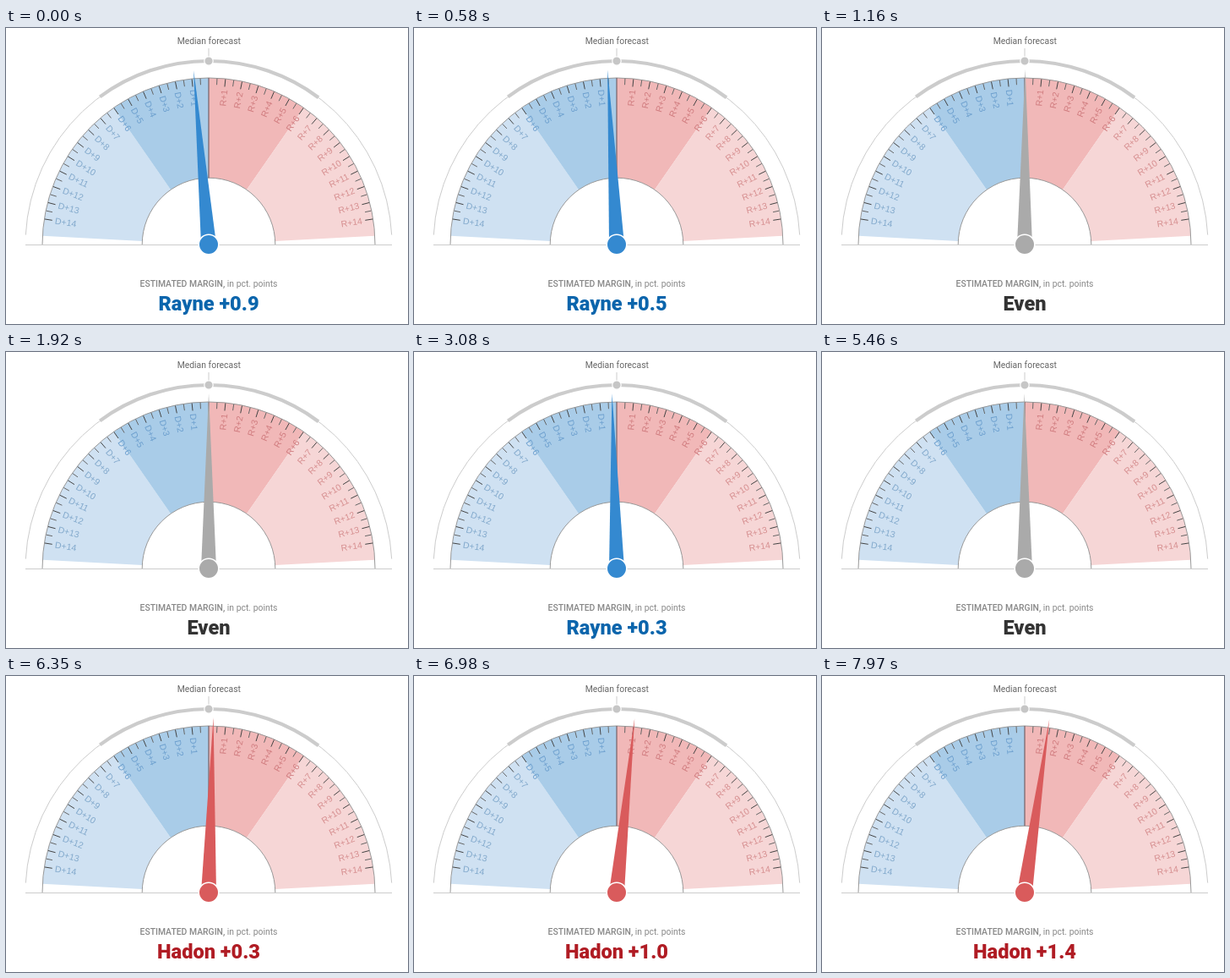
Recreate the animation shown at these times as an HTML page. Size 476 by 350 pixels, loop 8000 ms.

```html
<!DOCTYPE html>
<html lang="en">
<head>
<meta charset="utf-8">
<title>Election needle</title>
<style>
html, body { margin: 0; width: 100%; height: 100%; overflow: hidden; background: #fff; }
svg { display: block; width: 476px; height: 350px; font-family: Roboto, "Liberation Sans", sans-serif; }
.axis { fill: none; stroke: #999; }
.range { fill: none; stroke: #ccc; }
.label { font: 10.5px "Liberation Sans", Arial, sans-serif; }
</style>
</head>
<body>
<svg viewBox="0 0 476 350">
  <text x="240.3" y="19" text-anchor="middle" font-size="10.4" fill="#666">Median forecast</text>
  <g id="dial" transform="translate(240 256)"></g>
  <g id="needle">
    <path d="M-9 0L0 -207L9 0Z"/>
  </g>
  <circle id="hub" cx="240" cy="256" r="11.8" stroke="#fff" stroke-width="1.6"/>
  <text x="240" y="306" text-anchor="middle" font-size="10.4" fill="#888"><tspan font-weight="500">ESTIMATED MARGIN,</tspan> in pct. points</text>
  <text id="margin" x="240" y="334" text-anchor="middle" font-size="23.6" font-weight="800"></text>
</svg>
<script>
const NS = "http://www.w3.org/2000/svg";
const LOOP = 8000;
const END = 87, DEG = END / 15; // half sweep of the dial, degrees per point
const OUTER = 197, INNER = 78.8;
const $ = id => document.getElementById(id);
const dial = $("dial"), needle = $("needle"), hub = $("hub"), margin = $("margin");

function add(tag, attrs, text) {
  const el = document.createElementNS(NS, tag);
  for (const k in attrs) el.setAttribute(k, attrs[k]);
  if (text) el.textContent = text;
  dial.appendChild(el);
}

// Angles run clockwise from straight up.
function polar(deg, r) {
  const a = deg * Math.PI / 180;
  return (r * Math.sin(a)).toFixed(2) + " " + (-r * Math.cos(a)).toFixed(2);
}
const arc = (a, b, r) => `M${polar(a, r)}A${r} ${r} 0 0 1 ${polar(b, r)}`;
const sector = (a, b) =>
  `${arc(a, b, OUTER)}L${polar(b, INNER)}A${INNER} ${INNER} 0 0 0 ${polar(a, INNER)}Z`;

const near = 6 * DEG;
[[-END, -near, "#cfe1f2"], [-near, 0, "#a9cce8"], [0, near, "#f1b8b8"], [near, END, "#f6d6d6"]]
  .forEach(([a, b, fill]) => add("path", { d: sector(a, b), fill }));

add("path", { d: "M-217 .5H217", class: "range", stroke: "#bbb" });
add("path", { d: arc(-90, 90, OUTER), class: "axis" });
add("path", { d: arc(-90, 90, INNER), class: "axis" });
add("path", { d: `M0 ${-OUTER}V${-INNER}`, stroke: "#755f66", "stroke-width": 1.2 });

for (let v = -14; v <= 14; v += 0.5) {
  if (!v) continue;
  const whole = v % 1 === 0;
  add("path", {
    d: `M${polar(v * DEG, 196.5)}L${polar(v * DEG, whole ? 187.5 : 189)}`,
    stroke: whole ? "#444" : "#666"
  });
  if (!whole) continue;
  const left = v < 0, inner = Math.abs(v) <= 6;
  add("text", {
    class: "label",
    transform: `rotate(${v * DEG + (left ? 90 : -90)}) translate(${left ? -184 : 184} 3.7)`,
    "text-anchor": left ? "start" : "end",
    fill: left ? (inner ? "#6c9fce" : "#82a9cc") : (inner ? "#d07c7f" : "#d68f90")
  }, (left ? "D+" : "R+") + Math.abs(v));
}

add("path", { d: arc(-END, END, 217), class: "range" });
add("path", { d: arc(-36.4, 36.8, 217), class: "range", "stroke-width": 4.2 });
add("path", { d: "M0 -232V-217", class: "range" });
add("circle", { cy: -217, r: 5.2, fill: "#c6c6c6", stroke: "#fff", "stroke-width": 1.2 });

const sine = p => (1 - Math.cos(Math.PI * p)) / 2;
const cubic = p => p < 0.5 ? 4 * p ** 3 : 1 - 4 * (1 - p) ** 3;
const glide = p => 1 - (1 - p ** 1.4) ** 3.5;

// [time, margin, easing towards the next step]
const steps = [
  [0, -0.855, sine], [1450, 0.12, cubic], [2010, 0, cubic], [2935, -0.27, cubic],
  [4190, 0.39, cubic], [5285, -0.03, cubic], [6200, 0.22, cubic],
  [6280, 0.22, glide], [8050, 1.4]
];

function valueAt(t) {
  const i = steps.findIndex(s => s[0] > t);
  const [t0, v0, ease] = steps[i - 1], [t1, v1] = steps[i];
  return v0 + (v1 - v0) * ease((t - t0) / (t1 - t0));
}

const looks = {
  "-1": { name: "Rayne", fill: "#3489d0", ink: "#0b65ac" },
  "0": { name: "Even", fill: "#aaa", ink: "#333" },
  "1": { name: "Hadon", fill: "#d95b5c", ink: "#b01c24" }
};

function draw(now) {
  const v = valueAt(now % LOOP);
  const tenths = Math.round(v * 10);
  const look = looks[Math.sign(tenths)];
  needle.setAttribute("transform", `translate(240 256) rotate(${v * DEG})`);
  needle.setAttribute("fill", look.fill);
  hub.setAttribute("fill", look.fill);
  margin.setAttribute("fill", look.ink);
  margin.textContent = look.name + (tenths ? " +" + Math.abs(tenths / 10).toFixed(1) : "");
}

const start = performance.now();
function tick() {
  draw(performance.now() - start);
  requestAnimationFrame(tick);
}
tick();
</script>
</body>
</html>
```
